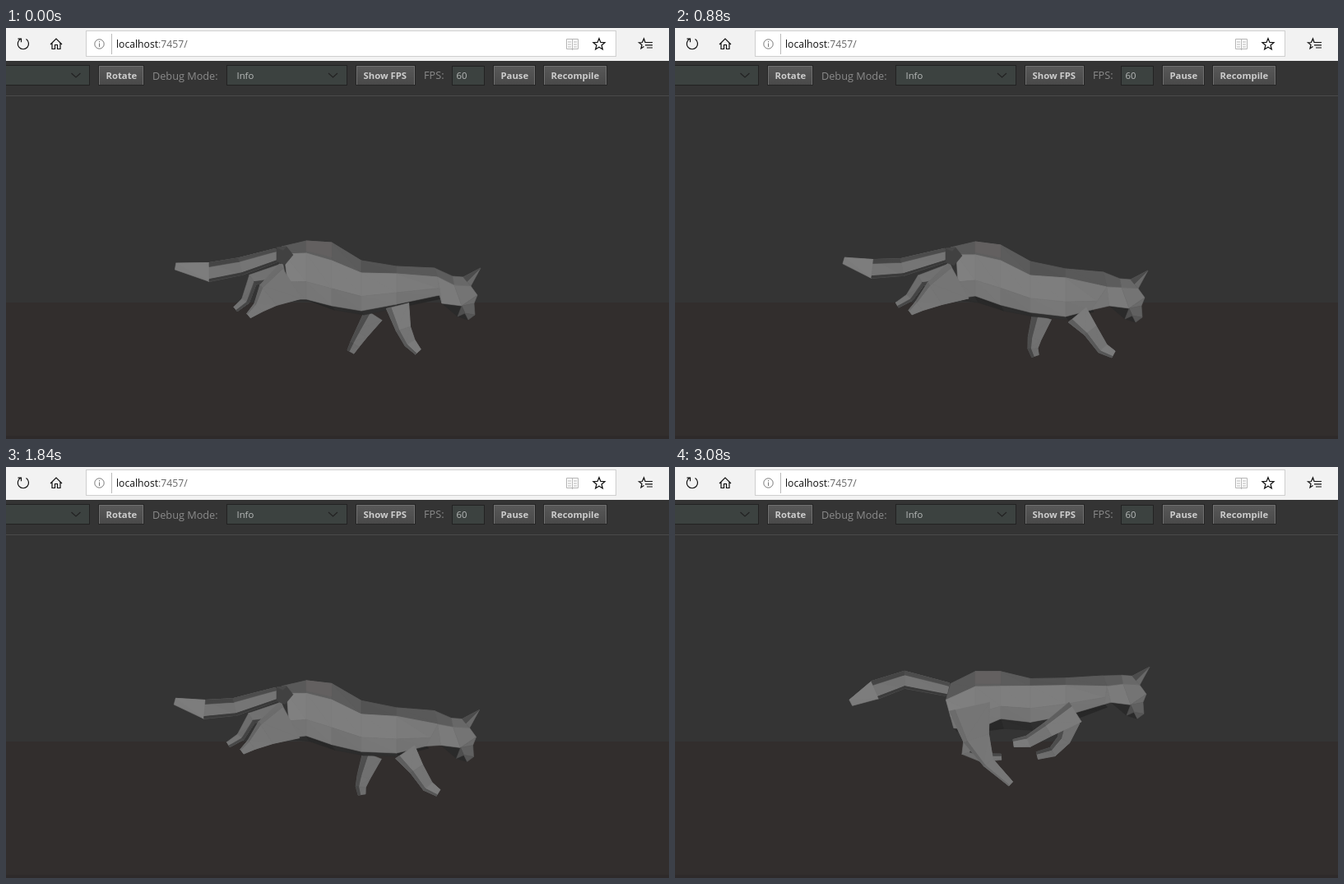
Animation, 806 px wide and 500 px high, one loop 3180 ms. Source, as an HTML page with a canvas:

```html
<!DOCTYPE html>
<html lang="en">
<head>
<meta charset="utf-8">
<title>Run cycle</title>
<style>
  html, body { margin: 0; width: 806px; height: 500px; overflow: hidden; background: #343434; }
  svg, canvas { position: absolute; left: 0; top: 0; display: block; }
  text { font-family: "Open Sans", "Noto Sans", sans-serif; }
  .btn { fill: url(#face); stroke: #262626; }
  .cap { fill: #cdcdcd; font-size: 11.3px; font-weight: 700; }
  .lab { fill: #8b8b8b; font-size: 12.7px; }
  .val { fill: #b9bcbb; font-size: 11.3px; }
  .field { fill: #3c4240; stroke: #222; }
  .line { fill: none; stroke: #111; stroke-width: 1.2; }
</style>
</head>
<body>
<svg width="806" height="500" viewBox="0 0 806 500">
  <defs>
    <linearGradient id="face" x1="0" y1="0" x2="0" y2="1">
      <stop offset="0" stop-color="#595959"/><stop offset="1" stop-color="#494949"/>
    </linearGradient>
  </defs>
  <rect width="806" height="500" fill="#343434"/>
  <rect y="334" width="806" height="166" fill="#322e2d"/>
  <rect y="496" width="806" height="4" fill="#2e2a2a"/>
  <rect y="82" width="806" height="1" fill="#4a4a4a"/>

  <rect width="806" height="40" fill="#f2f2f2"/>
  <rect x="97.5" y="3.5" width="644" height="31" fill="#fff" stroke="#cfcfcf"/>
  <path class="line" d="M17.5 13.5A6.6 6.6 0 1 0 24.5 13.6M14.5 13.2h4v4"/>
  <path class="line" d="M54 20l7-7 7 7M56 18.5v7h3.5v-5h3v5h3.5v-7"/>
  <g fill="none" stroke="#777">
    <circle cx="113.5" cy="19.5" r="5.7"/>
    <path d="M113.5 18.5v4.500M113.5 16v1.3"/>
    <path d="M128.5 7v25" stroke="#bbb"/>
    <path d="M681.5 13.5h14v12h-14zM688.5 14v13" stroke="#b5b5b5"/>
    <path d="M685 16.500v8M692 16.500v8" stroke="#b5b5b5" stroke-width="4" stroke-dasharray="1 2"/>
  </g>
  <path id="star" class="line"/>
  <path class="line" d="M779 17.5h-2l-1.500-4.500-2 4.500-4 .3 3.500 2.700-1 4.500 3.500-2.400M778 17.500h8M777 20.800h9M779 24h7"/>
  <text x="134" y="24" font-size="12.2" fill="#111">localhost<tspan fill="#666">:7457/</tspan></text>

  <rect class="field" x="-3.5" y="45.5" width="105" height="24"/>
  <rect class="field" x="268.5" y="45.5" width="146" height="24"/>
  <rect class="field" x="542.5" y="46.5" width="39" height="23"/>
  <path d="M79.5 55l5.500 5 5.500-5M392 55l5.500 5 5.500-5" fill="none" stroke="#222" stroke-width="1.2"/>
  <g id="buttons"></g>
  <text class="lab" x="178" y="63">Debug Mode:</text>
  <text class="val" x="280.5" y="62">Info</text>
  <text class="lab" x="508" y="62">FPS:</text>
  <text class="val" x="547.5" y="62">60</text>
</svg>
<canvas id="stage" width="806" height="500"></canvas>

<script>
const LOOP = 3180, LAST = 3080, TICK = 20;
const $ = id => document.getElementById(id);

$('star').setAttribute('d', 'M' + Array.from({ length: 10 }, (_, i) => {
  const r = i % 2 ? 3.2 : 7.4, a = Math.PI * (i / 5 - .5);
  return `${721 + r * Math.cos(a)} ${20 + r * Math.sin(a)}`;
}).join('L') + 'Z');

const buttons = [[113, 54, 'Rotate'], [426, 71, 'Show FPS'], [593, 50, 'Pause'], [654, 76, 'Recompile']];
$('buttons').innerHTML = buttons.map(([x, w, s]) =>
  `<rect class="btn" x="${x - .5}" y="45.5" width="${w + 1}" height="24"/>
   <path d="M${x + .5} 69V46.5H${x + w - .5}V69" fill="none" stroke="#707070"/>
   <text class="cap" x="${x + 8.5}" y="62">${s}</text>`).join('');

// Time in ms against run cycles.
const pace = [[0, .8], [580, 1.385], [880, 1.7], [1560, 2.435], [2100, 3], [2620, 3.54], [LAST, 3.985]];

// Phases: gathered, push-off, flight, landing, stance, lift.
const POSES = [0, .385, .435, .54, .7, .8];
const STEPS = [0, .2, .385, .435, .54, .7, .8, .885];
const track = (phases, rows) => rows.map((v, i) => [phases[i], v]);

// Limbs: joints from root to end, with half widths.
const tail = {
  half: [4, 11.5, 10.5, 8],
  keys: track(POSES, [
    [214,286, 243,270, 279,258, 332,271], [213,255, 239,257, 285,273, 330,291],
    [207,252, 234,254, 283,268, 331,280], [203,274, 242,284, 277,281, 330,277],
    [205,283, 240,293, 276,291, 330,276], [206,290, 247,297, 285,290, 330,276]])
};
const nearHind = {
  half: [25, 16, 7, 3.5],
  keys: track(STEPS, [
    [358,292, 366,330, 381,360, 408,387], [345,312, 328,350, 309,376, 311,403],
    [322,325, 286,343, 246,359, 221,363], [322,315, 282,323, 249,337, 236,344],
    [343,307, 314,323, 289,338, 271,346], [345,307, 316,323, 297,338, 286,346],
    [346,308, 319,325, 307,340, 295,350], [350,300, 348,338, 341,360, 357,371]])
};
const farHind = {
  half: [12, 7, 5, 3.5],
  keys: track(STEPS, [
    [365,318, 357,348, 375,355, 398,354], [350,318, 346,355, 345,380, 353,402],
    [350,346, 300,359, 276,368, 267,391], [330,328, 288,336, 264,340, 248,347],
    [334,298, 296,308, 280,327, 263,336], [337,298, 299,307, 285,328, 270,337],
    [339,298, 300,306, 291,332, 279,342], [350,306, 330,343, 336,353, 348,359]])
};
const nearFront = {
  half: [14, 9, 7, 4.5],
  keys: track(STEPS, [
    [488,296, 455,316, 431,330, 413,331], [505,303, 520,328, 517,342, 510,348],
    [520,326, 550,333, 574,343, 584,352], [528,332, 558,348, 580,354, 594,357],
    [508,352, 536,375, 556,387, 572,391], [489,349, 505,368, 520,390, 533,397],
    [476,338, 483,366, 491,383, 501,394], [477,327, 464,366, 454,387, 448,405]])
};
const farFront = {
  half: [12, 8, 6, 4.5],
  keys: track(STEPS, [
    [483,306, 477,330, 464,345, 446,350], [506,310, 524,338, 527,355, 526,365],
    [518,338, 550,345, 570,352, 583,369], [504,350, 535,364, 552,377, 565,379],
    [457,356, 453,380, 458,392, 467,400], [446,351, 437,378, 435,390, 438,399],
    [447,349, 432,372, 424,385, 419,394], [461,334, 440,360, 428,371, 410,374]])
};

// Torso heights at six columns, rump to neck.
const columns = [335, 365, 396, 432, 475, 521];
const backY = track(POSES, [
  [264,249,249,257,256,253], [284,277,276,276,276,269], [273,268,271,277,278,277],
  [268,262,266,283,294,298], [267,260,264,284,293,297], [266,259,261,283,290,292]]);
const ridgeY = track(POSES, [
  [284,268,267,266,265,266], [297,314,301,297,288,290], [290,304,297,300,297,306],
  [279,281,285,302,306,315], [276,276,283,301,304,315], [275,274,283,298,299,303]]);
const flankY = track(POSES, [
  [318,320,306,310,302,288], [352,349,346,343,336,320], [339,340,340,340,341,335],
  [329,328,338,346,354,343], [329,326,337,346,351,343], [330,330,338,344,336,325]]);
const bellyDrop = track(POSES, [
  [4,3,12,10,8,4], [3,5,4,5,11,18], [5,6,8,10,15,12],
  [3,8,7,7,6,2], [3,8,7,5,4,2], [2,2,5,5,4,4]]);
// Ridge start, flank start, throat.
const endsX = track(POSES, [[329,338,522], [326,312,528], [327,318,534], [342,342,515], [342,345,506], [338,345,527]]);
const earTip = track(POSES, [[577,242], [579,262], [577,267], [573,291], [575,295], [577,292]]);

const ctx = $('stage').getContext('2d');
const mix = (a, b, u) => a + (b - a) * u;
const mixPt = (p, q, u) => [mix(p[0], q[0], u), mix(p[1], q[1], u)];

// Cyclic Hermite curve through the keys.
function sample(keys, c) {
  const n = keys.length;
  const key = k => {
    const turn = Math.floor(k / n), [t, v] = keys[k - turn * n];
    return { t: t + turn, v };
  };
  let i = n - 1;
  while (keys[i][0] > c) i--;
  const [a, b, d, e] = [i - 1, i, i + 1, i + 2].map(key);
  const h = d.t - b.t, u = (c - b.t) / h, u2 = u * u, u3 = u2 * u;
  return b.v.map((p, j) => {
    const q = d.v[j];
    const m = (q - a.v[j]) / (d.t - a.t) * h, w = (e.v[j] - p) / (e.t - b.t) * h;
    return (2 * u3 - 3 * u2 + 1) * p + (u3 - 2 * u2 + u) * m + (3 * u2 - 2 * u3) * q + (u3 - u2) * w;
  });
}

function poly(pts, g, warm = 0) {
  ctx.beginPath();
  pts.forEach(p => ctx.lineTo(p[0], p[1]));
  ctx.closePath();
  ctx.fillStyle = ctx.strokeStyle = `rgb(${g + warm},${g},${g})`;
  ctx.fill();
  ctx.stroke();
}

// Fixed shade change per facet.
const grain = k => { const s = Math.sin(k * 12.9898 + 4.1) * 43758.5453; return s - Math.floor(s) - .5; };

// Facets between two edges; bands are [from, to, shade, first column].
function strip(a, b, bands, seed, spread = 10) {
  bands.forEach(([lo, hi, g, first = 0], r) => {
    for (let i = first; i < a.length - 1; i++) {
      const p = mixPt(a[i], b[i], lo), q = mixPt(a[i + 1], b[i + 1], lo);
      const s = mixPt(a[i + 1], b[i + 1], hi), t = mixPt(a[i], b[i], hi);
      const k = seed + r * 17 + i * 2;
      const shade = (Array.isArray(g) ? g[i] : g) + spread * grain(k);
      poly([p, q, s, t], Math.round(shade));
      poly([p, q, s], Math.round(shade + spread * .4 * grain(k + 1)));
    }
  });
}

// Edges at the half widths on both sides of the joints.
function limb({ half, keys }, c, bands, seed) {
  const v = sample(keys, c);
  const joints = half.map((_, i) => [v[2 * i], v[2 * i + 1]]);
  const left = [], right = [];
  joints.forEach(([x, y], i) => {
    const p = joints[Math.max(i - 1, 0)], q = joints[Math.min(i + 1, joints.length - 1)];
    const dx = q[0] - p[0], dy = q[1] - p[1], k = half[i] / Math.hypot(dx, dy);
    left.push([x + dy * k, y - dx * k]);
    right.push([x - dy * k, y + dx * k]);
  });
  strip(left, right, bands, seed);
}

function drawHead([ex, ey], top, ridge, low) {
  const at = (...v) => v.map(([x, y]) => [ex + x, ey + y]);
  const [tip, earBack, earFront, brow, bridge, nose, chin, jaw, throat, temple, cheek, crown, lip] =
    at([0, 0], [-21, 11], [-12, 22], [-4, 33], [-8, 43], [-7, 57], [-15, 63], [-28, 59],
       [-47, 43], [-32, 21], [-23, 46], [-34, 10], [-19, 55]);
  poly([throat, cheek, chin, jaw], 42);
  poly([top, crown, temple, ridge], 92);
  poly([crown, earBack, earFront, temple], 104);
  poly([ridge, throat, low], 118);
  poly([ridge, temple, cheek, throat], 123);
  poly([temple, earFront, brow, cheek], 116);
  poly([brow, bridge, cheek], 106);
  poly([cheek, bridge, nose, lip], 96);
  poly([cheek, lip, jaw], 78);
  poly([lip, nose, chin], 86);
  poly([earBack, tip, earFront], 104);
  poly([earBack, tip, mixPt(earBack, earFront, .5)], 76);
}

function drawFox(c) {
  ctx.clearRect(0, 0, 806, 500);
  ctx.lineWidth = .6;
  ctx.lineJoin = 'round';
  // The shoulders rise briefly after the gathered pose.
  const lift = 10 * Math.exp(-(((c - .09) / .045) ** 2));
  const [ridgeX, flankX, throatX] = sample(endsX, c);
  const row = (keys, first, last) => sample(keys, c).map((y, i) =>
    [i === 0 ? first : i === 5 ? last : columns[i], y - lift * i / 5]);
  const back = row(backY, 335, 521);
  const ridge = row(ridgeY, ridgeX, 525);
  const flank = row(flankY, flankX, throatX);
  const drop = sample(bellyDrop, c);
  const belly = flank.map(([x, y], i) => [x + 4 - i / 5, y + drop[i]]);

  limb(farHind, c, [[0, 1, 110], [0, .28, 72]], 3);
  limb(farFront, c, [[0, 1, 112], [.72, 1, 74]], 29);
  limb(tail, c, [[0, 1, 119], [0, .22, 74, 1], [.88, 1, 58, 1]], 51);

  strip(flank, belly, [[0, 1, 43]], 71, 8);
  strip(back, ridge, [[0, 1, [88, 98, 90, 84, 88]]], 83);
  poly([back[1], back[2], mixPt(back[2], ridge[2], .8), mixPt(back[1], ridge[1], .8)], 96, 3);
  strip(ridge, flank, [[0, .62, 125], [.62, 1, 117]], 97, 9);
  limb(nearHind, c, [[0, 1, 119], [.86, 1, 104]], 131);
  limb(nearFront, c, [[0, 1, 121], [.8, 1, 92]], 163);

  if (c > .49 && c < .86) {
    const [x, y] = back[0];
    const knob = [[-6, 1], [6, 0], [14, 10], [4, 22], [-6, 18]].map(p => [x + p[0], y + p[1]]);
    poly(knob, 65);
    poly([knob[0], knob[1], mixPt(knob[0], knob[2], .4)], 73);
  }
  const [ex, ey] = sample(earTip, c);
  drawHead([ex, ey - lift], back[5], ridge[5], flank[5]);
}

function cycleAt(t) {
  let i = 0;
  while (i < pace.length - 2 && t >= pace[i + 1][0]) i++;
  const [t0, c0] = pace[i], [t1, c1] = pace[i + 1];
  return mix(c0, c1, (t - t0) / (t1 - t0)) % 1;
}

const start = performance.now();
function render() {
  const t = (performance.now() - start) % LOOP;
  drawFox(cycleAt(Math.min(Math.floor(t / TICK) * TICK, LAST)));
  requestAnimationFrame(render);
}
render();
</script>
</body>
</html>
```
